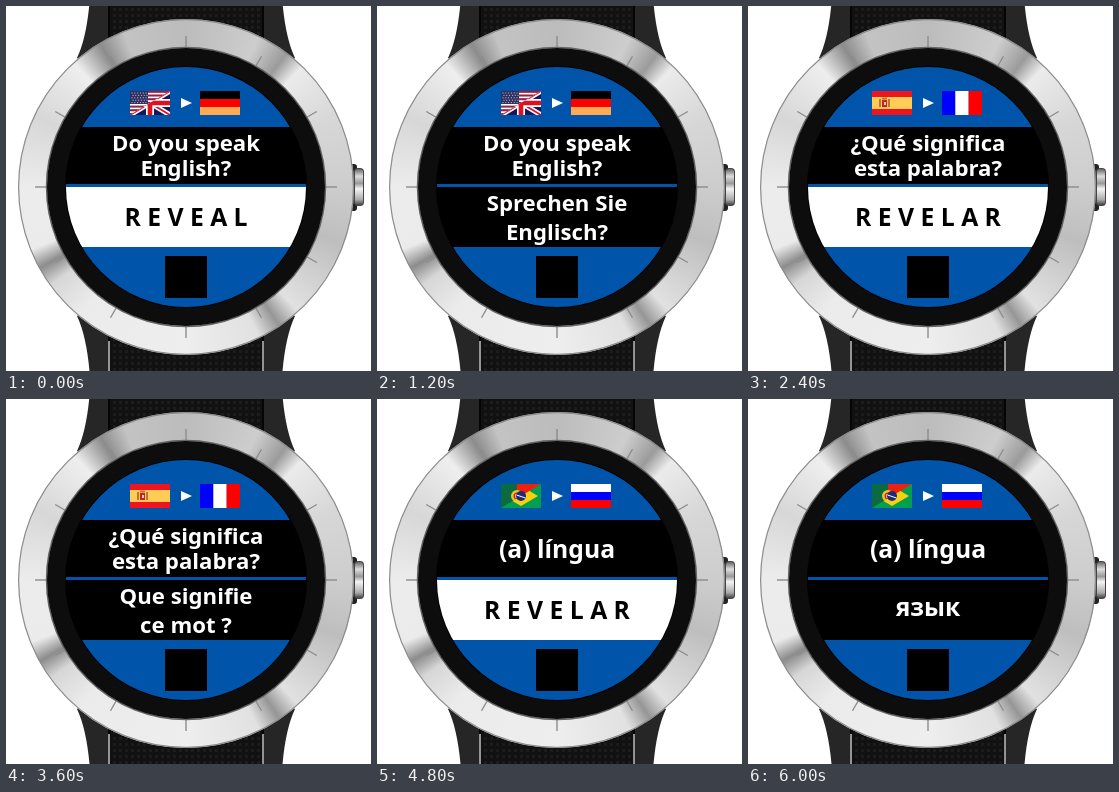
Recreate the animation shown at these times as an HTML page with a canvas. Size 365x365 px, loop 7200 ms.

```html
<!DOCTYPE html>
<html lang="en">
<head>
<meta charset="utf-8">
<title>Watch flash cards</title>
<style>
html, body { margin: 0; width: 100%; height: 100%; overflow: hidden; background: #fff; }
canvas { display: block; }
</style>
</head>
<body>
<canvas id="stage" width="365" height="365"></canvas>
<script>
const ctx = document.getElementById('stage').getContext('2d');
const CX = 180, CY = 181, TAU = Math.PI * 2;
const BLUE = '#0055aa';
const STEP = 1200;
const LARGE = 24.7, SMALL = 22.2;

// Baselines for one line and for two lines of text.
const QUESTION = { one: [159], two: [145, 170] };
const ANSWER = { one: [217], two: [205, 234] };

const cards = [
  { from: usUk, to: germany, question: ['Do you speak', 'English?'],
    button: 'R E V E A L', answer: ['Sprechen Sie', 'Englisch?'] },
  { from: spain, to: france, question: ['¿Qué significa', 'esta palabra?'],
    button: 'R E V E L A R', answer: ['Que signifie', 'ce mot ?'] },
  { from: portugalBrazil, to: russia, question: ['(a) língua'],
    button: 'R E V E L A R', answer: ['язык'] },
];

function rect(color, x, y, w, h) {
  ctx.fillStyle = color;
  ctx.fillRect(x, y, w, h);
}

function roundRect(color, x, y, w, h, r) {
  ctx.fillStyle = color;
  ctx.beginPath();
  ctx.roundRect(x, y, w, h, r);
  ctx.fill();
}

function disc(color, x, y, r) {
  ctx.fillStyle = color;
  ctx.beginPath();
  ctx.arc(x, y, r, 0, TAU);
  ctx.fill();
}

function ring(color, r, width) {
  ctx.strokeStyle = color;
  ctx.lineWidth = width;
  ctx.beginPath();
  ctx.arc(CX, CY, r, 0, TAU);
  ctx.stroke();
}

function trace(points) {
  ctx.beginPath();
  points.forEach(([x, y]) => ctx.lineTo(x, y));
  ctx.closePath();
}

function polygon(color, points) {
  trace(points);
  ctx.fillStyle = color;
  ctx.fill();
}

function line(color, width, x1, y1, x2, y2) {
  ctx.strokeStyle = color;
  ctx.lineWidth = width;
  ctx.beginPath();
  ctx.moveTo(x1, y1);
  ctx.lineTo(x2, y2);
  ctx.stroke();
}

function text(string, baseline, size, color) {
  ctx.font = `bold ${size}px "Noto Sans", "Open Sans", sans-serif`;
  ctx.textAlign = 'center';
  ctx.fillStyle = color;
  ctx.fillText(string, CX, baseline);
}

function lines(strings, baselines) {
  if (strings.length === 1) text(strings[0], baselines.one[0], LARGE, '#fff');
  else strings.forEach((s, i) => text(s, baselines.two[i], SMALL, '#fff'));
}

// Flags are drawn in a 40 x 24 box.
function flag(draw, x, y) {
  ctx.save();
  ctx.translate(x, y);
  ctx.beginPath();
  ctx.rect(0, 0, 40, 24);
  ctx.clip();
  draw();
  ctx.restore();
}

// Keeps drawing to the lower right half of a flag.
function lowerHalf(draw) {
  ctx.save();
  trace([[40, 0], [40, 24], [0, 24]]);
  ctx.clip();
  draw();
  ctx.restore();
}

const bands = (...colors) => colors.forEach((c, i) => rect(c, 0, i * 8, 40, 8));

function germany() { bands('#000', '#f00', '#fa5'); }
function russia() { bands('#fff', '#00f', '#f00'); }
function france() { ['#00f', '#fff', '#f00'].forEach((c, i) => rect(c, i * 40 / 3, 0, 40 / 3, 24)); }

function spain() {
  rect('#f0141e', 0, 0, 40, 24);
  rect('#fc5', 0, 6, 40, 12);
  rect('#b8763c', 7, 8, 2, 8);
  rect('#b8763c', 16, 8, 2, 8);
  rect('#c8202c', 10, 9, 5, 7);
  rect('#e8c8a0', 12, 11, 2, 3);
  rect('#b8763c', 10, 6.5, 5, 2);
}

function usUk() {
  for (let i = 0; i < 13; i++) rect(i % 2 ? '#fff' : '#b01830', 0, i * 24 / 13, 40, 24 / 13);
  rect('#303060', 0, 0, 18, 13);
  for (let row = 0; row < 5; row++)
    for (let col = 0; col < 6; col++) rect('#c8c8dc', 1.5 + col * 2.8 + row % 2, 1.5 + row * 2.4, 1, 1);

  lowerHalf(() => {
    rect('#101860', 0, 0, 40, 24);
    for (const [color, width] of [['#fff', 5], ['#e01020', 1.8]]) {
      line(color, width, 0, 0, 40, 24);
      line(color, width, 0, 24, 40, 0);
    }
    for (const [color, width] of [['#fff', 8], ['#e01020', 4.6]]) {
      line(color, width, 20, 0, 20, 24);
      line(color, width, 0, 12, 40, 12);
    }
  });
}

function portugalBrazil() {
  rect('#f02010', 0, 0, 40, 24);
  rect('#0a6a40', 0, 0, 16, 24);
  disc('#e8c820', 16, 12, 6);
  disc('#d82020', 16, 12, 3.5);
  rect('#fff', 14.5, 10, 3, 4);
  lowerHalf(() => {
    rect('#00a050', 0, 0, 40, 24);
    polygon('#f8d010', [[3, 12], [20, 2], [37, 12], [20, 22]]);
  });
  disc('#202878', 20, 12, 5);
  line('#fff', 1, 15.5, 11, 24.5, 14);
}

// One tapering lug, drawn at the top left and mirrored to the other corners.
function drawLug(flipX, flipY) {
  ctx.save();
  ctx.translate(CX, CY);
  ctx.scale(flipX, flipY);
  ctx.fillStyle = '#262626';
  ctx.beginPath();
  ctx.moveTo(-70, -190);
  ctx.lineTo(-96, -190);
  ctx.quadraticCurveTo(-99, -150, -109, -129);
  ctx.lineTo(-70, -100);
  ctx.fill();
  ctx.restore();
}

function drawStrap() {
  for (const flipX of [1, -1])
    for (const flipY of [1, -1]) drawLug(flipX, flipY);
  rect('#111', 104, 0, 153, 365);
  for (let y = 2; y < 365; y += 6)
    for (let x = 107; x < 256; x += 6) rect('#1c1c1c', x, y, 3, 3);
  for (const x of [103, 257]) {
    line('#050505', 2, x, 0, x, 335);
    line('#bbb', 1.5, x, 335, x, 365);
  }
}

function drawCrown() {
  const metal = ctx.createLinearGradient(0, 163, 0, 199);
  [[0, '#666'], [.2, '#ddd'], [.4, '#999'], [.55, '#f4f4f4'], [.85, '#aaa'], [1, '#444']]
    .forEach(([at, color]) => metal.addColorStop(at, color));
  roundRect('#222', 340, 158, 11, 47, 3);
  roundRect('#444', 348, 162, 10, 38, 4);
  roundRect(metal, 349, 163, 8, 36, 3);
}

function drawCase() {
  // Brushed metal: grey levels by angle in degrees, clockwise from the right.
  const metal = ctx.createConicGradient(0, CX, CY);
  const greys = [[0, 205], [20, 190], [40, 215], [48, 225], [56, 150], [64, 225], [90, 238],
    [130, 235], [144, 215], [151, 140], [158, 235], [180, 236], [205, 215], [228, 238],
    [239, 140], [248, 195], [270, 188], [296, 205], [307, 155], [314, 235], [335, 215], [360, 205]];
  greys.forEach(([angle, g]) => metal.addColorStop(angle / 360, `rgb(${g},${g},${g})`));
  disc(metal, CX, CY, 168);
  ring('#8c8c8c', 167.4, 1.2);
  for (let i = 0; i < 12; i++) {
    const c = Math.cos(i * TAU / 12), s = Math.sin(i * TAU / 12);
    line('#8c8c8c', 1.4, CX + 140 * c, CY + 140 * s, CX + 151 * c, CY + 151 * s);
  }
  ring('#666', 139.5, 1.5);
  disc('#0d0d0d', CX, CY, 139);
}

function drawScreen(card, revealed) {
  disc('#000', CX, CY, 121);
  ctx.save();
  ctx.beginPath();
  ctx.arc(CX, CY, 120, 0, TAU);
  ctx.clip();
  rect(BLUE, 60, 61, 240, 60);
  rect(BLUE, 60, 178, 240, 3);
  rect(BLUE, 60, 241, 240, 60);
  if (!revealed) rect('#fff', 60, 181, 240, 60);
  rect('#000', 159, 250, 42, 42);
  ctx.restore();

  flag(card.from, 124, 85);
  flag(card.to, 194, 85);
  polygon('#fff', [[175, 92], [186, 97], [175, 102]]);
  lines(card.question, QUESTION);
  if (revealed) lines(card.answer, ANSWER);
  else text(card.button, 220, LARGE, '#000');
}

function frame() {
  const step = Math.floor(performance.now() / STEP) % (cards.length * 2);
  rect('#fff', 0, 0, 365, 365);
  drawStrap();
  drawCrown();
  drawCase();
  drawScreen(cards[step >> 1], step % 2 === 1);
  requestAnimationFrame(frame);
}
frame();
</script>
</body>
</html>
```
